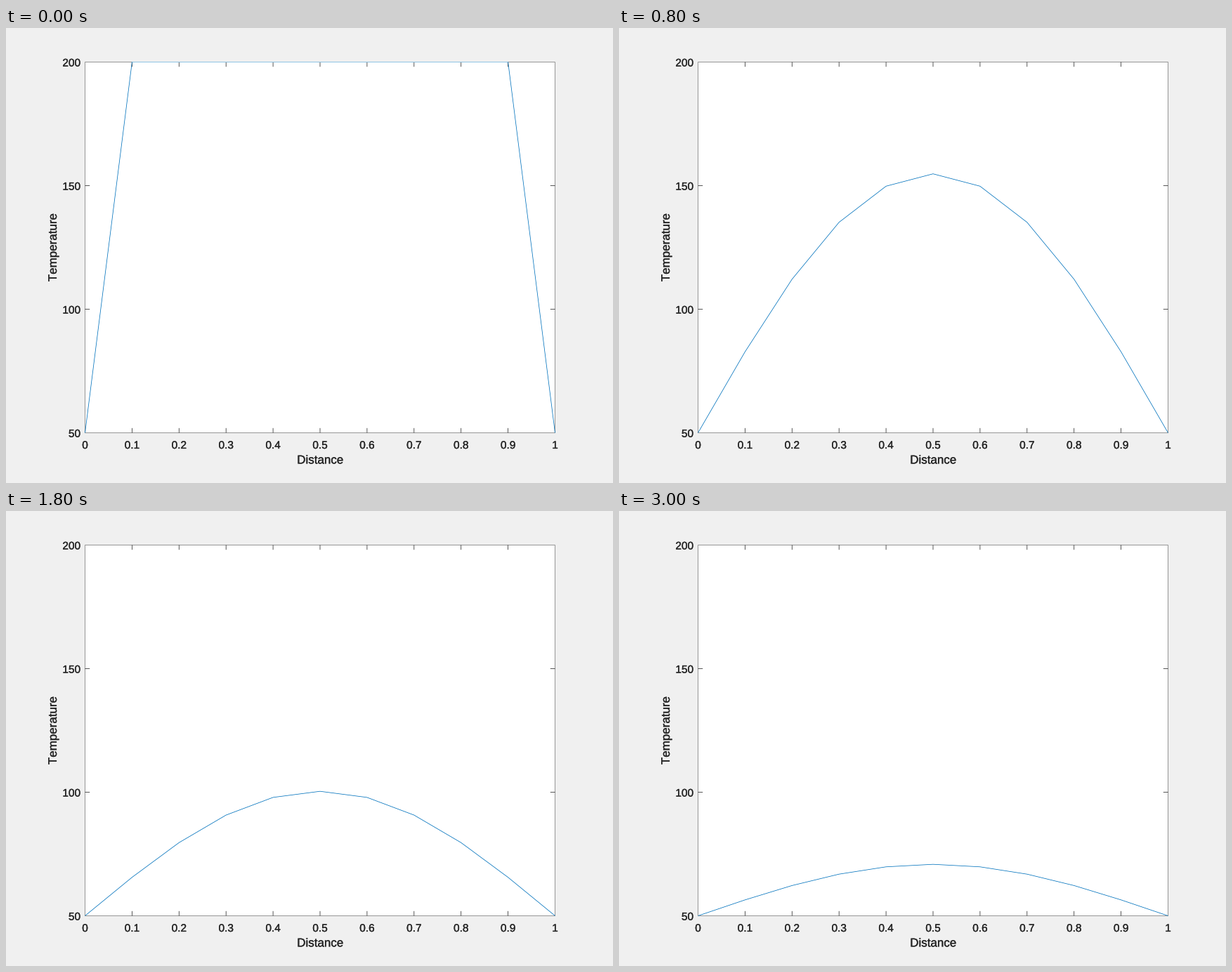
A matplotlib script that plays this animation: 864x648 px, repeating every 3.1 s.

```python
import matplotlib.pyplot as plt
import numpy as np
from matplotlib.animation import FuncAnimation
from matplotlib.patches import Rectangle
from matplotlib.patheffects import withStroke

W, H, DPI = 864, 648, 72
LEFT, RIGHT, TOP, BOTTOM = 112.5, 781.5, 48.5, 576.5
FRAMES, INTERVAL = 31, 100

HOT, COLD = 200, 50
NODES = 11
STEPS_PER_FRAME = 10
FOURIER = 0.0749  # diffusivity * dt / dx^2 for one explicit step

INK = "#262626"
BLUE = "#0072bd"
THIN = 0.77
TICK = 6.7

plt.rcParams["font.family"] = "Liberation Sans"
plt.rcParams["text.hinting"] = "none"
plt.rcParams["text.kerning_factor"] = 6


def px(x):
    return LEFT + x * (RIGHT - LEFT)


def py(temp):
    return BOTTOM - (temp - COLD) / (HOT - COLD) * (BOTTOM - TOP)


def heat_history():
    temp = np.full(NODES, float(HOT))
    temp[[0, -1]] = COLD
    history = [temp.copy()]
    for _ in range(FRAMES - 1):
        for _ in range(STEPS_PER_FRAME):
            temp[1:-1] += FOURIER * np.diff(temp, 2)
        history.append(temp.copy())
    return history


fig = plt.figure(figsize=(W / DPI, H / DPI), dpi=DPI, facecolor="#f0f0f0")
ax = fig.add_axes([0, 0, 1, 1])
ax.set_xlim(0, W)
ax.set_ylim(H, 0)
ax.axis("off")


def line(xs, ys, color, width, zorder):
    artist, = ax.plot(xs, ys, color=color, lw=width, snap=False,
                      solid_capstyle="butt", solid_joinstyle="round",
                      zorder=zorder)
    return artist


def tick(x, y, dx, dy):
    line([x, x + dx], [y, y + dy], INK, THIN, 2)


def label(x, y, text, size, ha="center", rotation=0):
    # A hairline outline gives the slightly heavy screen lettering.
    ax.text(x, y, text, size=size, color=INK, ha=ha, va="baseline",
            rotation=rotation, rotation_mode="anchor",
            path_effects=[withStroke(linewidth=0.3, foreground=INK)])


ax.add_patch(Rectangle((LEFT, TOP), RIGHT - LEFT, BOTTOM - TOP, lw=1,
                       facecolor="white", edgecolor="#969696", snap=False,
                       zorder=1))

for i in range(NODES):
    x = px(i / 10)
    if 0 < i < NODES - 1:
        tick(x, BOTTOM, 0, -TICK)
        tick(x, TOP, 0, TICK)
    label(x, 599, f"{i / 10:g}", 15.43)

for temp in range(COLD, HOT + 1, 50):
    y = py(temp)
    if COLD < temp < HOT:
        tick(LEFT, y, TICK, 0)
        tick(RIGHT, y, -TICK, 0)
    label(106, y + 6.1, str(temp), 15.43, ha="right")

label(447.3, 620.4, "Distance", 16.97)
label(72, 312.5, "Temperature", 16.97, rotation=90)

xs = px(np.linspace(0, 1, NODES))
curve = line([], [], BLUE, THIN, 3)
# The plateau lies on the box edge, where the line shows paler.
plateau = line([px(0.1), px(0.9)], [TOP, TOP], "#8fc3e3", 1, 4)
history = heat_history()


def draw(frame):
    curve.set_data(xs, py(history[frame]))
    plateau.set_visible(frame == 0)
    return curve, plateau


anim = FuncAnimation(fig, draw, frames=FRAMES, interval=INTERVAL,
                     repeat=True, repeat_delay=0)
plt.show()
```
